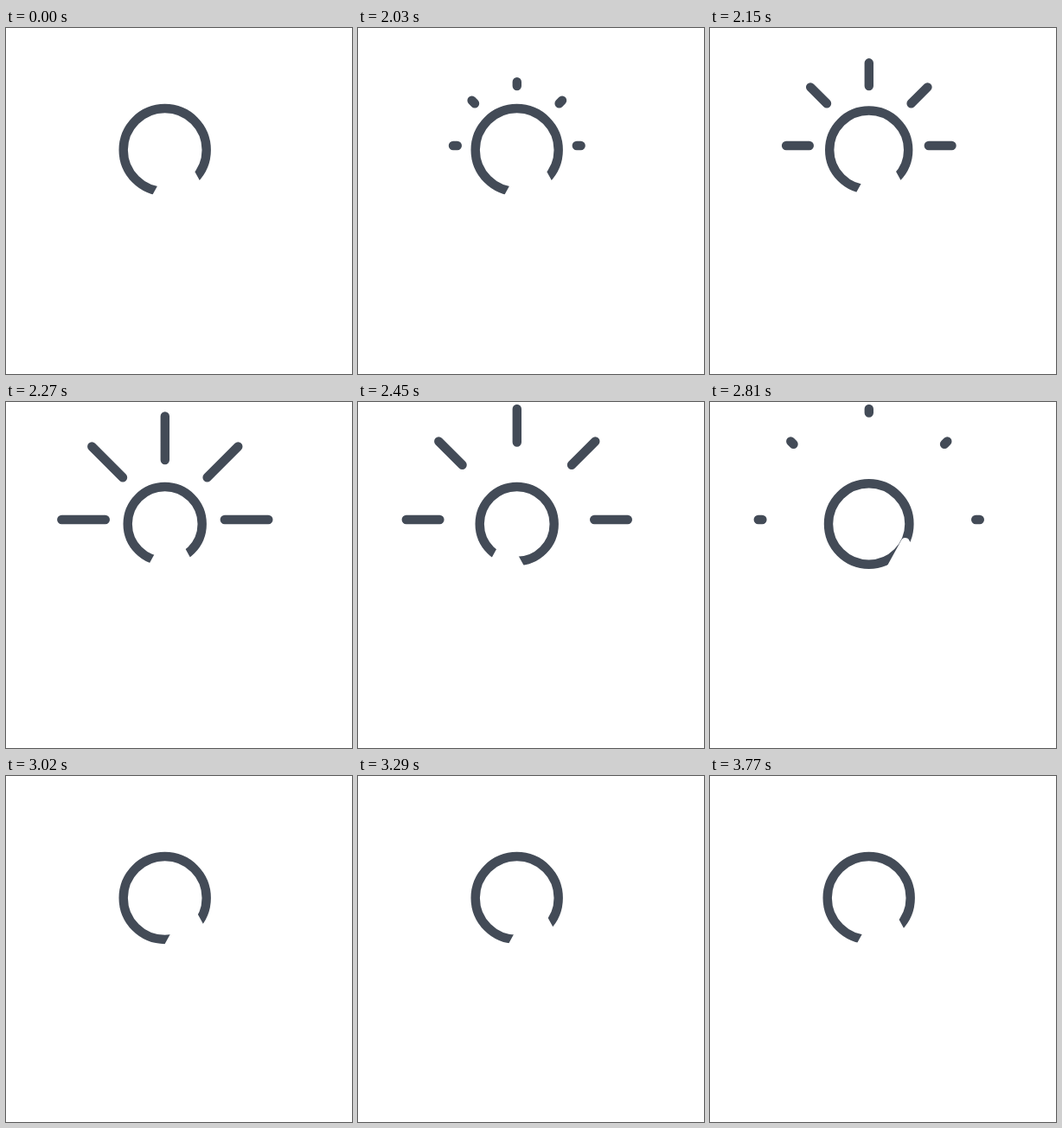
An HTML page that plays this animation: 400x400 px, repeating every 3860 ms.

```html
<!DOCTYPE html>
<html lang="en">
<head>
<meta charset="utf-8">
<title>Sun behind a peak</title>
<style>
  html, body { margin: 0; width: 100%; height: 100%; overflow: hidden; background: #fff; }
  svg { display: block; width: 100vw; height: 100vh; }
  #ring, #rays { fill: none; stroke: #434b57; stroke-width: 10.4; }
  #rays { stroke-linecap: round; }
  #peak { fill: #fff; stroke: #fff; stroke-width: 10; stroke-linejoin: round; }
</style>
</head>
<body>
<svg viewBox="0 0 400 400">
  <circle id="ring" cx="183.7" cy="141" r="48"/>
  <path id="peak" d="M0 10.4L90 174H-90Z"/>
  <path id="rays"/>
</svg>
<script>
const LOOP = 3860, START = 2030, END = 3770, STEP = 30;
const RAY_IN = 69, RAY_LENGTH = 59;
const [ring, peak, rays] = ['ring', 'peak', 'rays'].map(id => document.getElementById(id));

const mix = (a, b, u) => a + (b - a) * u;
const progress = (s, from, to) => Math.min(1, Math.max(0, (s - from) / (to - from)));
const smooth = (s, from, to) => {
  const u = progress(s, from, to);
  return u * u * (3 - 2 * u);
};
const easeIn = (s, from, to) => progress(s, from, to) ** 2;
const easeOut = (s, from, to) => 1 - (1 - progress(s, from, to)) ** 2;

// The sun shrinks as the rays shoot out, then swells back
const radius = s => 48 - 5 * smooth(s, 0, 240) * (1 - smooth(s, 420, 960));

// The peak leans left, swings over to the right and settles
function peakPlace(s) {
  const pull = easeIn(s, 0, 430);
  const settle = Math.exp(-Math.max(0, s - 780) / 260);
  const swing = smooth(s, 430, 780);
  return [201.2 + mix(-32 * pull, 24.5 * settle, swing), 135 + 16.5 * mix(pull, settle, swing)];
}

function rayPath(s) {
  const tail = RAY_IN + RAY_LENGTH * easeOut(s, 290, 970);
  const tip = RAY_IN + RAY_LENGTH * smooth(s, -72, 338);
  if (tail >= tip) return '';
  let d = '';
  for (let i = 0; i < 5; i++) {
    const a = Math.PI * i / 4;
    const at = r => `${183.8 + r * Math.cos(a)} ${136 - r * Math.sin(a)}`;
    d += `M${at(tail)}L${at(tip)}`;
  }
  return d;
}

function draw(now) {
  const moving = Math.min(END, now % LOOP) - START;
  const s = Math.floor(moving / STEP) * STEP;
  ring.setAttribute('r', radius(s));
  peak.setAttribute('transform', `translate(${s < 0 ? peakPlace(0) : peakPlace(s)})`);
  rays.setAttribute('d', s < 0 ? '' : rayPath(s));
}

const origin = performance.now();
function tick() {
  draw(performance.now() - origin);
  requestAnimationFrame(tick);
}
tick();
</script>
</body>
</html>
```
